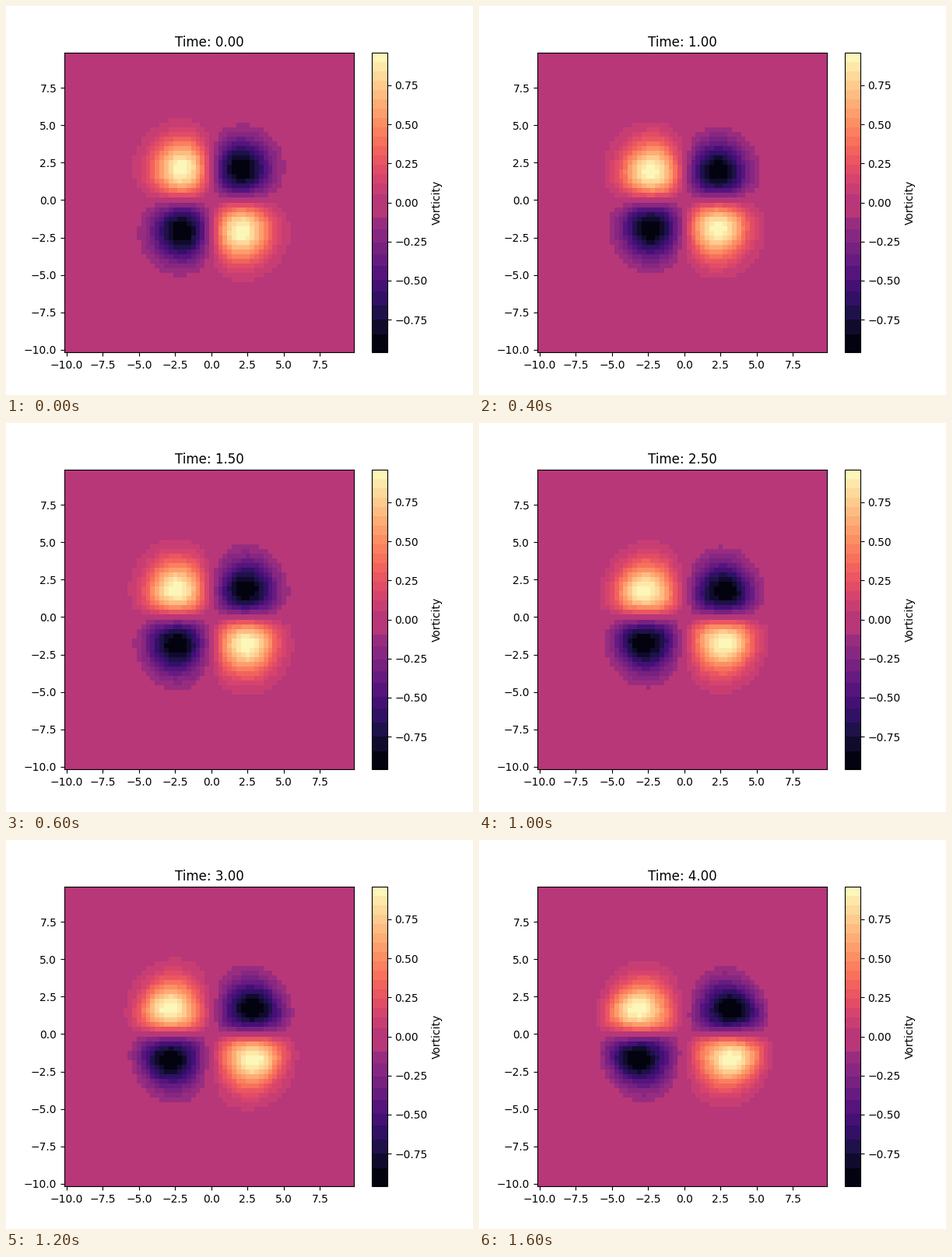
These frames come from a looping animation (600 px wide and 500 px high, 1800 ms). A matplotlib script:

```python
import numpy as np
import matplotlib.pyplot as plt
from matplotlib.animation import FuncAnimation
from matplotlib.colors import ListedColormap

N, L = 64, 20.0
FRAMES, INTERVAL = 9, 200
FRAME_TIME = 0.5
SUBSTEPS = 10

# Periodic grid and wavenumbers
x = np.linspace(-L / 2, L / 2, N, endpoint=False)
X, Y = np.meshgrid(x, x)
k = 2 * np.pi * np.fft.fftfreq(N, L / N)
KX, KY = np.meshgrid(k, k)
K2 = KX**2 + KY**2
K2[0, 0] = 1
k_max = np.abs(k).max()
DEALIAS = (np.abs(KX) < 2 / 3 * k_max) & (np.abs(KY) < 2 / 3 * k_max)


def real(f_hat):
    return np.fft.ifft2(f_hat).real


def tendency(w_hat):
    """Advection of vorticity, with psi_hat = -w_hat / k^2."""
    psi_hat = -w_hat / K2
    u = real(1j * KY * psi_hat)
    v = real(-1j * KX * psi_hat)
    adv = u * real(1j * KX * w_hat) + v * real(1j * KY * w_hat)
    return -np.fft.fft2(adv) * DEALIAS


def rk4(w, dt):
    a = tendency(w)
    b = tendency(w + dt / 2 * a)
    c = tendency(w + dt / 2 * b)
    d = tendency(w + dt * c)
    return w + dt / 6 * (a + 2 * b + 2 * c + d)


def initial_vorticity():
    """Four Gaussian vortices of alternating sign."""
    w = np.zeros_like(X)
    for cx in (-2, 2):
        for cy in (-2, 2):
            w -= np.sign(cx * cy) * np.exp(-((X - cx)**2 + (Y - cy)**2) / 4)
    return w


def simulate():
    w = initial_vorticity()
    fields = [w]
    w_hat = np.fft.fft2(w)
    for _ in range(FRAMES - 1):
        for _ in range(SUBSTEPS):
            w_hat = rk4(w_hat, FRAME_TIME / SUBSTEPS)
        fields.append(real(w_hat))
    return fields


def banded_magma():
    """Magma reduced to flat bands, with one wide band around zero."""
    lut = plt.get_cmap("magma")(np.arange(256))
    edges = [0, 15, 28, 40, 52, 62, 74, 84, 94, 105, 115, 135]
    edges += list(range(144, 257, 8))
    middle = lut[128].copy()
    for lo, hi in zip(edges, edges[1:]):
        lut[lo:hi] = middle if lo <= 128 < hi else lut[lo:hi].mean(axis=0)
    return ListedColormap(lut)


fields = simulate()
peak = np.abs(fields[0]).max()

fig, ax = plt.subplots(figsize=(6, 5), dpi=100)
mesh = ax.pcolormesh(X, Y, fields[0], cmap=banded_magma(),
                     vmin=-peak, vmax=peak, shading="nearest")
fig.colorbar(mesh, ax=ax, label="Vorticity")
title = ax.set_title("Time: 0.00")


def update(i):
    mesh.set_array(fields[i])
    title.set_text(f"Time: {i * FRAME_TIME:.2f}")
    return mesh, title


anim = FuncAnimation(fig, update, frames=FRAMES, interval=INTERVAL,
                     repeat=True, repeat_delay=0)
plt.show()
```
